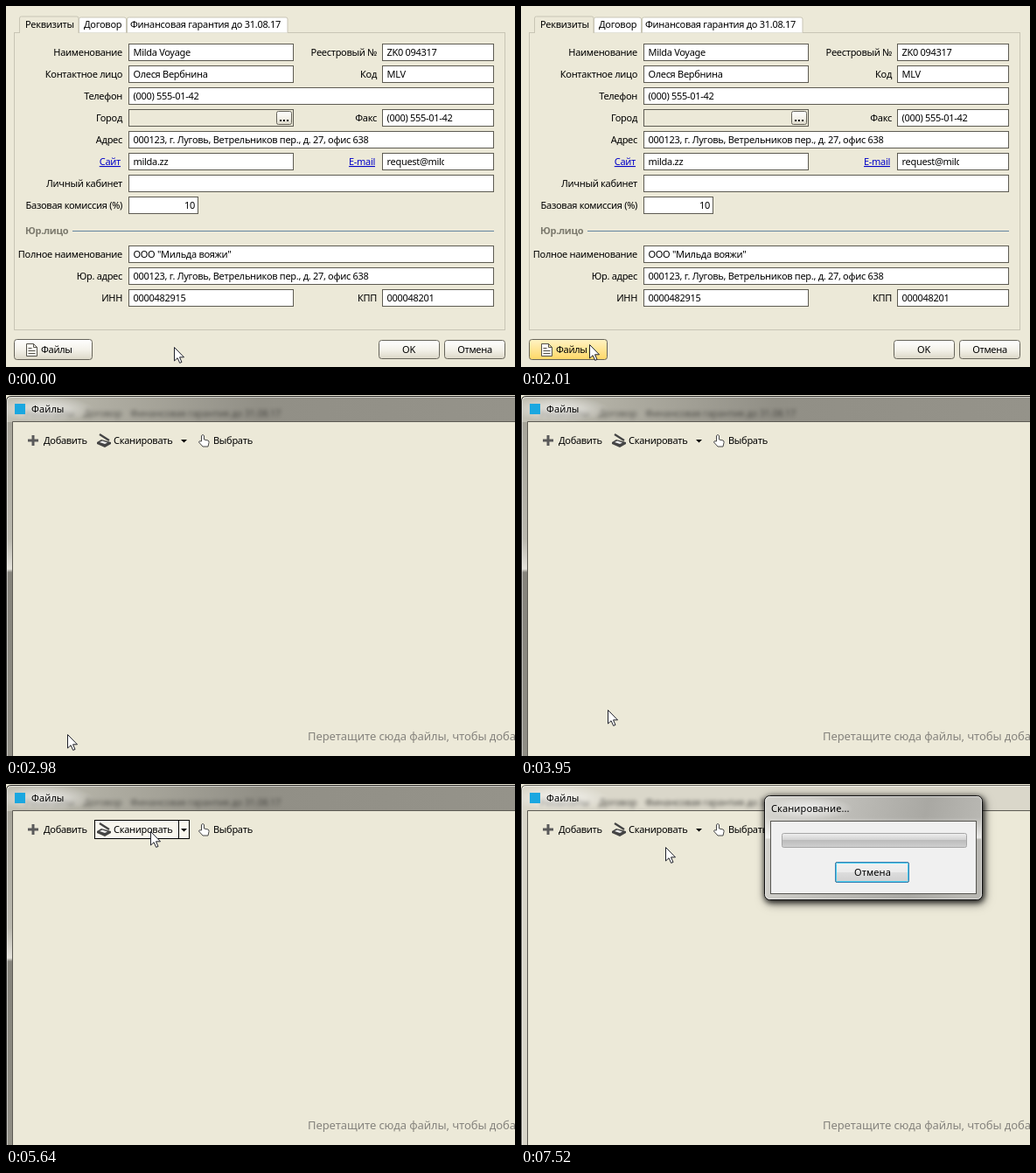
Animation, 582 px wide and 413 px high, one loop 8000 ms. Source, as an HTML page:

```html
<!DOCTYPE html>
<html lang="ru">
<head>
<meta charset="utf-8">
<style>
html, body { margin: 0; width: 100%; height: 100%; overflow: hidden; background: #ece9d8; }
svg { display: block; width: 582px; height: 413px; }
text { font: 11px "Noto Sans", "Open Sans", sans-serif; letter-spacing: -.3px; white-space: pre; }
.end { text-anchor: end; }
.mid { text-anchor: middle; }
.link { fill: #0000c8; text-decoration: underline; }
.head { font-weight: bold; fill: #7c7a6e; }
.hint { font-size: 13px; letter-spacing: -.1px; fill: #85837d; }
.title { letter-spacing: .1px; }
.field { fill: #fff; stroke: #5d5b52; }
.flat { fill: #ece9d8; }
.btn { fill: url(#plain); stroke: #66645a; }
.ghost { filter: blur(2px); font-weight: bold; }
.frame { stroke: #111; filter: drop-shadow(1px 2px 3px #000b) drop-shadow(1px 2px 5px #0009); }
</style>
</head>
<body>
<svg viewBox="0 0 582 413" xmlns="http://www.w3.org/2000/svg">
  <defs>
    <linearGradient id="plain" x2="0" y2="1">
      <stop stop-color="#fff"/><stop offset=".5" stop-color="#f4f2ea"/><stop offset="1" stop-color="#dcd8c8"/>
    </linearGradient>
    <linearGradient id="warm" x2="0" y2="1">
      <stop stop-color="#fff3c4"/><stop offset="1" stop-color="#ffd766"/>
    </linearGradient>
    <linearGradient id="pressed" x2="0" y2="1">
      <stop stop-color="#ffe08a"/><stop offset=".5" stop-color="#ffd150"/><stop offset="1" stop-color="#ffdc78"/>
    </linearGradient>
    <linearGradient id="barOn">
      <stop stop-color="#c3c1b5"/><stop offset=".2" stop-color="#aeaca1"/><stop offset=".5" stop-color="#918f86"/><stop offset="1" stop-color="#95938a"/>
    </linearGradient>
    <linearGradient id="sideOn" x2="0" y2="1">
      <stop stop-color="#a6a499"/><stop offset=".35" stop-color="#bab8ae"/><stop offset=".44" stop-color="#e4e2da"/>
      <stop offset=".45" stop-color="#85837b"/><stop offset="1" stop-color="#908e85"/>
    </linearGradient>
    <linearGradient id="popup" x2="1" y2=".1">
      <stop stop-color="#d6d5d0"/><stop offset=".4" stop-color="#bdbcb7"/><stop offset=".75" stop-color="#a9a8a3"/><stop offset="1" stop-color="#b8b7b2"/>
    </linearGradient>
    <linearGradient id="gleam" x2="0" y2="1">
      <stop offset=".2" stop-color="#fff" stop-opacity="0"/><stop offset=".4" stop-color="#fff" stop-opacity=".7"/>
      <stop offset=".42" stop-color="#fff" stop-opacity="0"/>
    </linearGradient>
    <linearGradient id="track" x2="0" y2="1">
      <stop stop-color="#f0f0f0"/><stop offset=".45" stop-color="#d3d3d3"/><stop offset=".5" stop-color="#bcbcbc"/><stop offset="1" stop-color="#d0d0d0"/>
    </linearGradient>
    <linearGradient id="grey" x2="0" y2="1">
      <stop stop-color="#f3f3f3"/><stop offset=".5" stop-color="#ebebeb"/><stop offset=".51" stop-color="#dddddd"/><stop offset="1" stop-color="#cfcfcf"/>
    </linearGradient>
    <radialGradient id="shine">
      <stop stop-color="#fff" stop-opacity=".75"/><stop offset="1" stop-color="#fff" stop-opacity="0"/>
    </radialGradient>
    <clipPath id="mailClip"><rect x="431" y="169" width="70" height="18"/></clipPath>
  </defs>

  <g id="form">
    <rect width="582" height="413" fill="#ece9d8"/>
    <rect x="9.5" y="30.5" width="561" height="340" fill="none" stroke="#c8c5b5"/>
    <path d="M83.5 30.5V15q0-2 2-2H135q2.500 0 2.500 2V30.500M138.500 30.500V15q0-2 2-2H320q2 0 2 2V30.500" fill="#fff" stroke="#c8c5b5"/>
    <path d="M15.500 31V14q0-2 2-2H81q2 0 2 2V31" fill="#ece9d8" stroke="#c8c5b5"/>
    <text x="22" y="25">Реквизиты</text>
    <text x="89" y="25">Договор</text>
    <text x="142" y="25">Финансовая гарантия до 31.08.17</text>
    <g id="rows"></g>
    <rect class="btn" x="309.500" y="120.500" width="17" height="15" rx="2"/>
    <path d="M313 131h2m2 0h2m2 0h2" stroke="#000" stroke-width="2"/>
    <text class="head" x="22" y="261">Юр.лицо</text>
    <path d="M76 257.500H558" stroke="#6485a0"/>
    <rect id="files" class="btn" x="9.500" y="381.500" width="89" height="23" rx="3"/>
    <path d="M23.500 386.500h8l4 4v10h-12zM31.500 386.500v4h4M25.500 391.500h4m-4 3h8m-8 3h8" fill="#f8f7f2" stroke="#55534b"/>
    <text x="40" y="397">Файлы</text>
    <rect class="btn" x="426.500" y="382.500" width="69" height="21" rx="3"/>
    <text class="mid" x="460.500" y="397">OK</text>
    <rect class="btn" x="501.500" y="382.500" width="69" height="21" rx="3"/>
    <text class="mid" x="536" y="397">Отмена</text>
  </g>

  <g id="window">
    <rect width="582" height="413" fill="#ece9d8"/>
    <path id="bar" d="M0 31V7Q0 1 6 1H582V31Z"/>
    <rect id="side" y="31" width="8" height="382"/>
    <g id="ghost" class="ghost">
      <text x="22" y="25">Реквизиты</text>
      <text x="89" y="25">Договор</text>
      <text x="142" y="25">Финансовая гарантия до 31.08.17</text>
    </g>
    <ellipse cx="45" cy="16" rx="55" ry="15" fill="url(#shine)"/>
    <path id="edge" d="M.5 413V7Q.5 1.500 6 1.500H582" fill="none"/>
    <path d="M1.500 413V7q0-4.500 5-4.500H582" fill="none" stroke="#fff" stroke-opacity=".5"/>
    <path d="M7.500 413V30.500H582" fill="none" stroke="#5c5a53"/>
    <rect x="10" y="10" width="12" height="12" fill="#1aa7e0"/>
    <text class="title" x="29" y="20">Файлы</text>
    <path d="M31 46v12M25 52h12" stroke="#5a5a5a" stroke-width="3"/>
    <text x="43" y="56">Добавить</text>
    <g id="hover" stroke="#000" fill="#f8f6ee"><rect x="101.500" y="41.500" width="96" height="21"/><rect x="197.500" y="41.500" width="12" height="21"/></g>
    <path d="M104 54l5-3 11 3v2l-7 4-9-4z" fill="#444"/>
    <path d="M107 54l3-1.500 6 2-3 1.500z" fill="#eee"/>
    <path d="M107 45l11 7" stroke="#444" stroke-width="2.200"/>
    <text x="123" y="56">Сканировать</text>
    <path d="M200 51h7l-3.500 3.500z"/>
    <path d="M223.500 53V46.500q1.500-2 3 0V51l4.500 1q1.500.5 1 2.500l-1 4.500h-6l-4.500-5q0-2 3-1z" fill="#fff" stroke="#474747"/>
    <text x="237" y="56">Выбрать</text>
    <text class="hint" x="345" y="395">Перетащите сюда файлы, чтобы добавить</text>
  </g>

  <g id="scan">
    <rect class="frame" x="278.500" y="13.500" width="249" height="119" rx="6" fill="url(#popup)"/>
    <rect x="279.500" y="14.500" width="247" height="117" rx="5" fill="url(#gleam)" stroke="#fff" stroke-opacity=".55"/>
    <ellipse cx="330" cy="28" rx="50" ry="13" fill="url(#shine)"/>
    <text class="title" x="286" y="32">Сканирование...</text>
    <rect x="285.500" y="42.500" width="235" height="83" fill="#f0f0f0" stroke="#55544f"/>
    <rect x="298.500" y="56.500" width="211" height="16" rx="2" fill="url(#track)" stroke="#a6a6a6"/>
    <rect id="cancel" x="359.500" y="89.500" width="84" height="23" rx="2"/>
    <g id="glow" fill="none">
      <rect x="359.500" y="89.500" width="84" height="23" rx="2" stroke="#3c7fb1"/>
      <rect x="360.500" y="90.500" width="82" height="21" rx="1" stroke="#46cdef"/>
    </g>
    <text id="cancelText" class="mid title" x="402" y="105">Отмена</text>
  </g>

  <circle id="click" cx="71" cy="390" r="10.500" fill="none" stroke="#333"/>
  <path id="cursor" d="M.5.5V16l3.600-3.300L6.700 18.400l2.300-1-2.500-5.600H11.500Z" fill="#fff" stroke="#20222c"/>
</svg>
<script>
const $ = id => document.getElementById(id);
const LEFT = 140, RIGHT = 430, HALF = 329, FULL = 558;
const address = '000123, г. Луговь, Ветрельников пер., д. 27, офис 638';

// label, row centre, field start, field end, value
const rows = [
  ['Наименование', 53, LEFT, HALF, 'Milda Voyage'],
  ['Реестровый №', 53, RIGHT, FULL, 'ZK0 094317'],
  ['Контактное лицо', 78, LEFT, HALF, 'Олеся Вербнина'],
  ['Код', 78, RIGHT, FULL, 'MLV'],
  ['Телефон', 103, LEFT, FULL, '(000) 555-01-42'],
  ['Город', 128, LEFT, HALF, ''],
  ['Факс', 128, RIGHT, FULL, '(000) 555-01-42'],
  ['Адрес', 153, LEFT, FULL, address],
  ['Сайт', 178, LEFT, HALF, 'milda.zz'],
  ['E-mail', 178, RIGHT, FULL, 'request@milda.zz'],
  ['Личный кабинет', 203, LEFT, FULL, ''],
  ['Базовая комиссия (%)', 228, LEFT, 220, '10'],
  ['Полное наименование', 284, LEFT, FULL, 'ООО "Мильда вояжи"'],
  ['Юр. адрес', 309, LEFT, FULL, address],
  ['ИНН', 334, LEFT, HALF, '0000482915'],
  ['КПП', 334, RIGHT, FULL, '000048201']
];

$('rows').innerHTML = rows.map(([label, y, x, end, value]) => {
  const link = y === 178, number = value === '10';
  const labelEnd = x - (x === LEFT ? 7 : 6) - (link ? 2 : 0);
  return `<text class="end${link ? ' link' : ''}" x="${labelEnd}" y="${y + 4}">${label}</text>
    <rect class="field${label === 'Город' ? ' flat' : ''}" x="${x + .5}" y="${y - 9.5}" width="${end - x - 1}" height="19"/>
    <text ${number ? 'class="end"' : ''} ${label === 'E-mail' ? 'clip-path="url(#mailClip)"' : ''}
      x="${number ? end - 4 : x + 5.5}" y="${y + 4}">${value}</text>`;
}).join('');

// time, x, y of the pointer tip; each pose is held until the next
const moves = [
  [0, 192, 390], [1310, 190, 390], [1460, 169, 386], [1610, 135, 385], [1740, 104, 386],
  [1880, 86, 387], [2010, 78, 387], [2130, 73, 387], [2270, 72, 388], [2400, 70, 388],
  [3820, 78, 382], [3950, 99, 360], [4100, 141, 311], [4400, 138, 290], [4530, 135, 262],
  [4670, 144, 219], [4800, 149, 196], [4920, 153, 175], [5070, 158, 148], [5210, 168, 112],
  [5370, 172, 82], [5510, 168, 62], [5640, 165, 54], [7220, 165, 65], [7370, 165, 69], [7520, 165, 72]
];

const set = (id, name, value) => $(id).setAttribute(name, value);
const show = (id, on) => { $(id).style.display = on ? '' : 'none'; };

function draw(t) {
  const [, x, y] = moves.findLast(m => m[0] <= t);
  const open = t >= 2980, scanning = t >= 6070, ready = t >= 7220;
  set('cursor', 'transform', `translate(${x} ${y})`);
  show('form', !open);
  show('window', open);
  show('scan', scanning);
  show('click', t >= 2820 && !open);
  show('hover', t >= 5510 && !ready);
  $('files').style.fill = t >= 2820 ? 'url(#pressed)' : t >= 1880 ? 'url(#warm)' : '';
  set('bar', 'fill', scanning ? '#dad7ca' : 'url(#barOn)');
  set('side', 'fill', scanning ? '#d8d5c8' : 'url(#sideOn)');
  set('edge', 'stroke', scanning ? '#66645c' : '#2e2d29');
  set('ghost', 'opacity', scanning ? .65 : .5);
  set('cancel', 'fill', ready ? 'url(#grey)' : '#f0f0f0');
  set('cancel', 'stroke', ready ? '#707070' : '#adb2b5');
  set('cancelText', 'fill', ready ? '#000' : '#8a8a8a');
  set('glow', 'opacity', t >= 7520 ? 1 : t >= 7370 ? .7 : ready ? .35 : 0);
}

const start = performance.now();
function tick() {
  draw((performance.now() - start) % 8000);
  requestAnimationFrame(tick);
}
tick();
</script>
</body>
</html>
```
